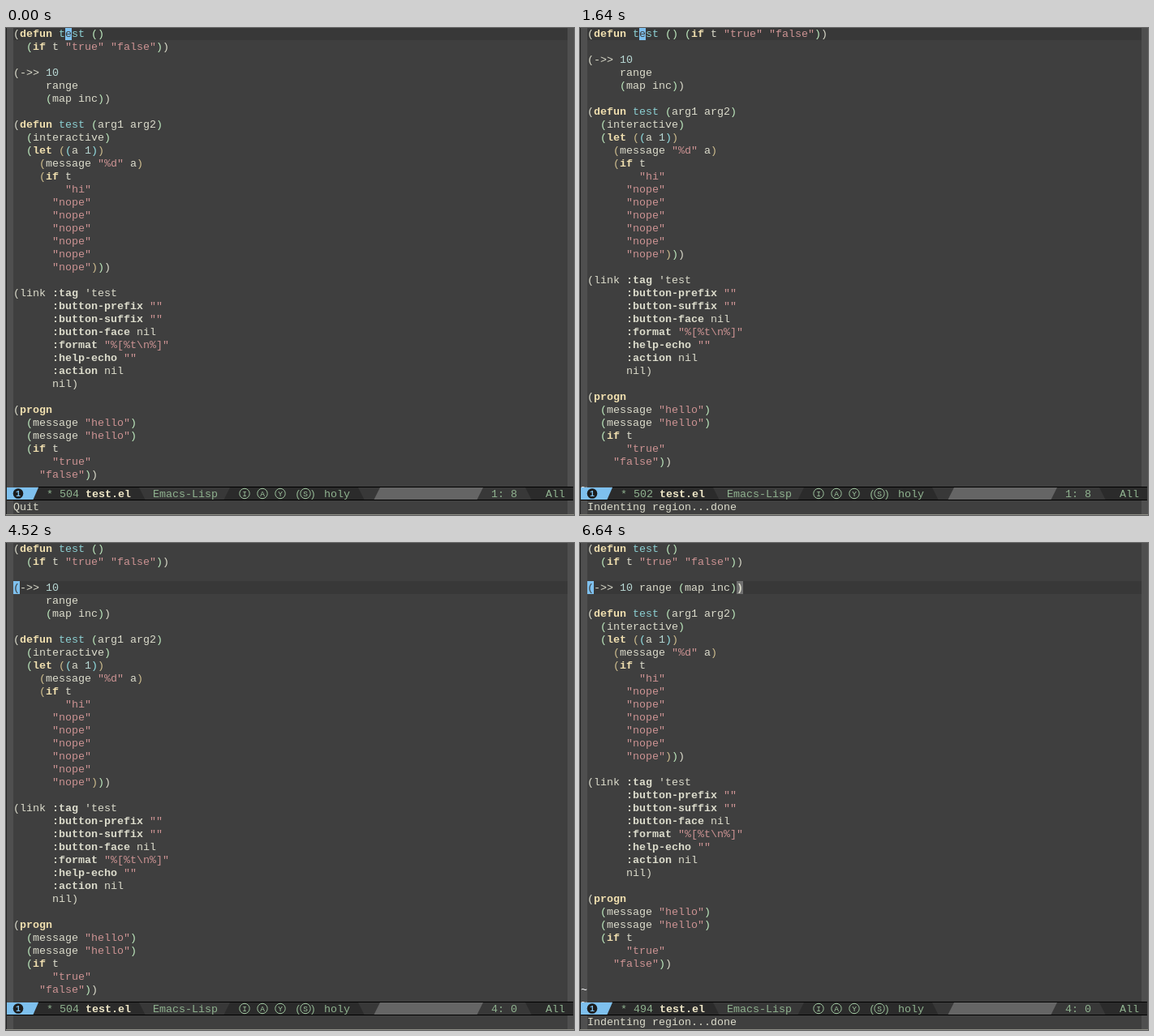
Animation, 700 px wide and 601 px high, one loop 8000 ms. Source, as an HTML page with a canvas:

```html
<!DOCTYPE html>
<html lang="en">
<head>
<meta charset="utf-8">
<title>Lisp editor</title>
<style>
html, body { margin: 0; height: 100%; overflow: hidden; background: #3f3f3f; }
canvas { display: block; }
</style>
</head>
<body>
<canvas id="stage" width="700" height="601"></canvas>
<script>
const ctx = document.getElementById('stage').getContext('2d');
const LOOP = 8000, LEFT = 9, CELL = 8, ROW = 16;
const FG = '#dcdccc', BG = '#3f3f3f', DARK = '#2b2b2b', DIM = '#383838';
const BLUE = '#7ec0ee', GREEN = '#8fb28f', YELLOW = '#f0dfaf', CYAN = '#8cd0d3';
const PARENS = [FG, '#bfebbf', '#d0bf8f', '#93e0e3', '#9fc59f', '#dfaf8f'];

const nopes = Array(6).fill('      "nope"').join('\n');
const split = `(defun test ()
  (if t "true" "false"))

(->> 10
     range
     (map inc))

(defun test (arg1 arg2)
  (interactive)
  (let ((a 1))
    (message "%d" a)
    (if t
        "hi"
${nopes})))

(link :tag 'test
      :button-prefix ""
      :button-suffix ""
      :button-face nil
      :format "%[%t\\n%]"
      :help-echo ""
      :action nil
      nil)

(progn
  (message "hello")
  (message "hello")
  (if t
      "true"
    "false"))`;
const joinDefun = split.replace(/\(\)\n +/, '() ');
const joinThread = split.replace(/10\n +range\n +/, '10 range ');

const DONE = 'Indenting region...done', KEY = 'M-RET-';
// start, text, size, echo line, cursor row, cursor column, matching paren [row, column]
const states = [
  [0, split, 504, 'Quit', 0, 8],
  [1160, split, 504, KEY, 0, 8],
  [1600, split, 504, DONE, 0, 8],
  [1640, joinDefun, 502, DONE, 0, 8],
  [3160, joinDefun, 502, '', 0, 8],
  [3200, joinDefun, 502, KEY, 0, 8],
  [3560, split, 504, DONE, 0, 8],
  [4080, split, 504, 'Mark set', 2, 0],
  [4520, split, 504, '', 3, 0],
  [4640, split, 504, '', 3, 0, [5, 14]],
  [5560, split, 504, KEY, 3, 0, [5, 14]],
  [6520, joinThread, 494, DONE, 3, 0],
  [6640, joinThread, 494, DONE, 3, 0, [3, 23]]
];

function rect(color, x, y, w, h) {
  ctx.fillStyle = color;
  ctx.fillRect(x, y, w, h);
}

function write(text, x, y, color = FG, bold = false, size = 13.333) {
  ctx.font = `${bold ? 'bold ' : ''}${size}px "Liberation Mono", "Courier New", monospace`;
  ctx.fillStyle = color;
  ctx.fillText(text, x, y);
}

function cell(color, row, col) {
  rect(color, LEFT + col * CELL, row * ROW - 1, CELL, ROW);
}

function drawCode(code, row, col, match) {
  let depth = 0;
  code.split('\n').forEach((line, r) => {
    let last = '';
    for (const m of line.matchAll(/"[^"]*"|[()]|[^\s()"]+/g)) {
      const word = m[0], x = LEFT + m.index * CELL, y = r * ROW + 11;
      let color = FG, bold = false;
      if (word === '(') color = PARENS[depth++];
      else if (word === ')') color = PARENS[--depth];
      else if (word[0] === '"') color = '#cc9393';
      else if (/^(defun|if|let|progn)$/.test(word)) [color, bold] = [YELLOW, true];
      else if (word[0] === ':') bold = true;
      else if (/^\d+$/.test(word)) color = '#b8d8d4';
      else if (last === 'defun') color = CYAN;
      if (match && match[0] === r && match[1] === m.index) bold = true;
      write(word, x, y, color, bold);
      last = word;
    }
    if (r === row && line[col]) {
      cell(BLUE, row, col);
      write(line[col], LEFT + col * CELL, r * ROW + 11, BG);
    }
  });
}

function ring(letter, x) {
  ctx.strokeStyle = '#9fc59f';
  ctx.lineWidth = 1;
  ctx.beginPath();
  ctx.arc(x, 574.5, 6.2, 0, 7);
  ctx.stroke();
  write(letter, x - 2.8, 577.8, '#9fc59f', false, 9.5);
}

function drawModeLine(size, row, col) {
  // each band runs from its slanted left edge to the right end
  const bands = [[BLUE, 1, 1], [DARK, 40, 33], [DIM, 164, 172], [DARK, 276, 268],
    [DIM, 434, 442], ['#656565', 461, 453], [DIM, 588, 580], [DARK, 640, 648]];
  for (const [color, top, bottom] of bands) {
    ctx.fillStyle = color;
    ctx.beginPath();
    ctx.moveTo(top, 567);
    ctx.lineTo(699, 567);
    ctx.lineTo(699, 583);
    ctx.lineTo(bottom, 583);
    ctx.fill();
  }
  rect('#000', 40, 566, 659, 1);
  rect('#000', 1, 582, 698, 1);
  ctx.fillStyle = '#1c1c1c';
  ctx.beginPath();
  ctx.arc(15, 574.5, 6.3, 0, 7);
  ctx.fill();
  write('1', 12, 578, BLUE, true, 10);
  write('* ' + size, 50, 579, GREEN);
  write('test.el', 98, 579, '#f0e8c8', true);
  write('Emacs-Lisp', 181, 579, GREEN);
  ring('I', 294);
  ring('A', 316);
  ring('Y', 338);
  write('(', 356, 579, GREEN);
  ring('S', 369);
  write(')', 374, 579, GREEN);
  write('holy', 392, 579, GREEN);
  write(`${row + 1}: ${col}`, 598, 579, GREEN);
  write('All', 665, 579, GREEN);
}

function draw([, code, size, echo, row, col, match]) {
  rect(BG, 0, 0, 700, 601);
  rect(DIM, LEFT, row * ROW - 1, 683, ROW);
  rect('#4f4f4f', 0, 0, LEFT, 601);
  rect('#4f4f4f', 692, 0, 8, 601);
  rect('#222', 0, 0, 1, 601);
  rect('#8c8c84', 0, 600, 700, 1);
  cell(BLUE, row, col);
  if (match) cell('#6f6f6f', ...match);
  drawCode(code, row, col, match);
  for (let r = code.split('\n').length + 1; r < 36; r++) write('~', 1, r * ROW + 11, '#fff');
  drawModeLine(size, row, col);
  write(echo, LEFT, 595);
}

let shown;
function tick() {
  const t = performance.now() % LOOP;
  const state = states.findLast(s => s[0] <= t);
  if (state !== shown) draw(shown = state);
  requestAnimationFrame(tick);
}
tick();
</script>
</body>
</html>
```
